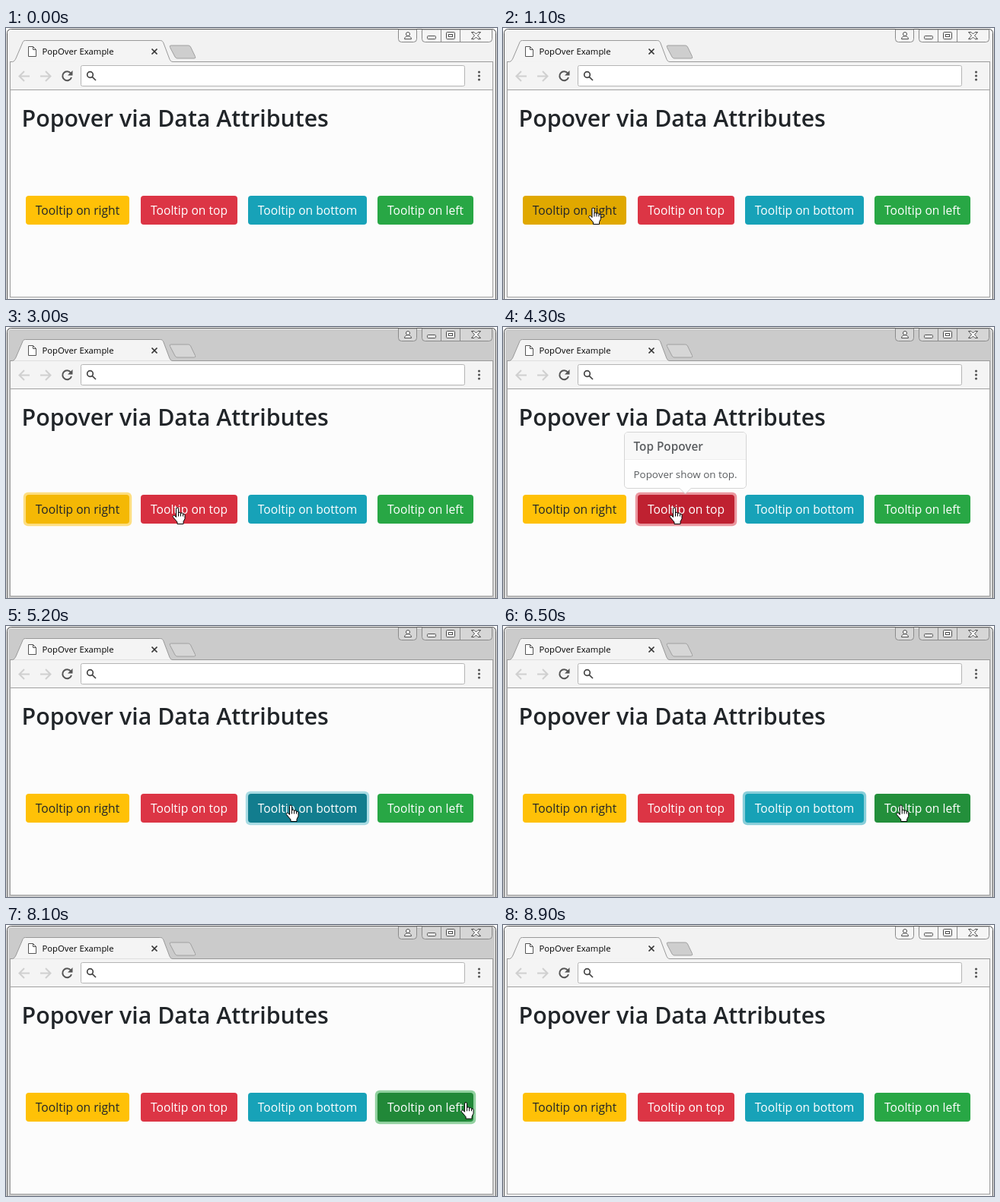
Animation, 645 px wide and 357 px high, one loop 9 s. Source, as an HTML page:

```html
<!DOCTYPE html>
<html lang="en">
<head>
<meta charset="utf-8">
<title>PopOver Example</title>
<style>
  html, body { margin: 0; width: 100%; height: 100%; overflow: hidden; background: #fff; }
  svg { display: block; width: 645px; height: 357px; font-family: "Open Sans", "Noto Sans", sans-serif; }
  .bold { font-weight: 600; }
</style>
</head>
<body>
<svg viewBox="0 0 645 357">
  <!-- window frame -->
  <path id="frame" d="M1.5 358V6.5a5 5 0 0 1 5-5H638.5a5 5 0 0 1 5 5V358" stroke="#484848"/>
  <path d="M2.5 358V7a4.5 4.5 0 0 1 4.5-4.5H638a4.5 4.5 0 0 1 4.5 4.5V358" fill="none" stroke="#fff" stroke-opacity=".7"/>
  <g id="controls" stroke="#8a8a8a">
    <path d="M515.5 2V14.5a4 4 0 0 0 4 4H535.5a4 4 0 0 0 4-4V2z"/>
    <path d="M546.5 2V14.5a4 4 0 0 0 4 4H634.5a4 4 0 0 0 4-4V2zM571.5 2V18M596.5 2V18"/>
  </g>
  <g fill="#fff" stroke="#4c4c4c">
    <circle cx="528" cy="8" r="2.5"/>
    <path d="M523.5 14.5c0-5 9-5 9 0z"/>
    <rect x="553.5" y="10.5" width="11" height="4" rx="1"/>
    <rect x="578.5" y="5.5" width="11" height="9" rx="1"/>
    <rect x="581.5" y="8.5" width="5" height="3"/>
    <path d="M611.5 5.5h3.5l2.5 2.5 2.5-2.5h3.5l-4 4.5 4 4.5h-3.5l-2.5-2.5-2.5 2.5h-3.5l4-4.5z"/>
  </g>

  <!-- tab strip and toolbar -->
  <rect x="5" y="45" width="635" height="37" fill="#f4f4f4"/>
  <path d="M5 44.5H8.5C11 44 12 42 13 40L21.5 20C22.5 17.5 23 16.5 25.5 16.5H202.5C205 16.5 206 17.5 207 20L214.5 40C215.500 42.500 216.500 44.500 219 44.5H640" fill="#f4f4f4" stroke="#999"/>
  <path id="newTab" d="M216.500 23H239.500q2 0 3 2L248.500 37.500q1 2.500-1 2.500H225q-2 0-3-2L215.500 25.500q-1-2.500 1-2.500z" stroke="#a0a0a0"/>
  <path d="M29.5 24.5h6l4 4v9h-10zM35.5 24.5v4h4" fill="#fff" stroke="#555"/>
  <text x="47.5" y="35" font-size="11.3">PopOver Example</text>
  <path d="M191.5 27.5l7 7M198.5 27.5l-7 7" stroke="#333" stroke-width="1.7"/>
  <g fill="none" stroke-width="2">
    <path d="M31 63.5H18M24 57l-6.5 6.5L24 70M45 63.5H58M52 57l6.5 6.5L52 70" stroke="#d0d0d0"/>
    <path d="M85 59.5A6 6 0 1 0 86 65" stroke="#555"/>
    <path d="M87.5 56v6.5H81z" fill="#555"/>
  </g>
  <rect x="98.5" y="49.5" width="504" height="27" rx="2" fill="#fff" stroke="#b4b4b4"/>
  <path d="M114.300 61.500a3.800 3.800 0 1 0-7.600 0a3.800 3.800 0 1 0 7.600 0M113.300 64.300L118 69" fill="none" stroke="#444" stroke-width="1.7"/>
  <path d="M621.5 58v10.500" stroke="#555" stroke-width="3.2" stroke-linecap="round" stroke-dasharray="0 5"/>

  <!-- page -->
  <rect x="5.5" y="81.5" width="634" height="273" fill="#fcfcfc" stroke="#a0a0a0"/>
  <path d="M5.5 45V82M639.5 45V82" stroke="#a0a0a0"/>
  <text class="bold" x="20.5" y="130" font-size="30.3" fill="#212529">Popover via Data Attributes</text>
  <g id="buttons"></g>
  <g id="popovers"></g>

  <g id="cursor" fill="#fff" stroke="#000">
    <path id="arrow" d="M.5 .5V16.5L4 13l2.5 6 2.5-1L6.5 12H11.5z"/>
    <path id="hand" transform="translate(-6.5 -.5)" d="M5 13V2a1.5 1.5 0 0 1 3 0V8a1.5 1.5 0 0 1 3 .3V8.7a1.5 1.5 0 0 1 3 .4V9.7a1.3 1.3 0 0 1 2.5 .5V15L14.5 19V22H6.5V19.5L1 13a1.5 1.5 0 0 1 2.2-2zM8 8V12M11 8.5V12M14 9.5V12"/>
  </g>
</svg>
<script>
const LOOP = 9000, STEP = 100, FADE = 150, HOLD = 110;
const TOP = 221, HEIGHT = 38, CARD = 74, GAP = 8.5;
const $ = id => document.getElementById(id);

// Colours: base, hover, pressed. Times: pointer enters, opens, closes, leaves.
const buttons = [
  { side: "Right", dx: 1, dy: 0, x: 26, w: 136, card: 169, note: "Right", ink: "#212529",
    colors: ["ffc107", "e0a800", "d39e00"], enter: 960, open: 1330, close: 2540, leave: 2910 },
  { side: "Top", dx: 0, dy: -1, x: 177, w: 127, card: 160, note: "top.", ink: "#fff",
    colors: ["dc3545", "c82333", "bd2130"], enter: 2950, open: 3420, close: 4150, leave: 4810 },
  { side: "Bottom", dx: 0, dy: 1, x: 318, w: 156, card: 184, note: "Bottom.", ink: "#fff",
    colors: ["17a2b8", "138496", "117a8b"], enter: 4830, open: 5101, close: 6040, leave: 6370 },
  { side: "Left", dx: -1, dy: 0, x: 488, w: 126, card: 159, note: "Left", ink: "#fff",
    colors: ["28a745", "218838", "1e7e34"], enter: 6395, open: 6720, close: 7520, leave: 8150 }
];

const START = [621, 51];
const moves = [
  { from: 500, to: 1050, x: 118.5, y: 237 },
  { from: 2800, to: 3000, x: 225, y: 238 },
  { from: 4600, to: 5000, x: 374, y: 236 },
  { from: 6300, to: 6530, x: 530, y: 236 },
  { from: 6500, to: 6700, x: 537, y: 236 },
  { from: 7700, to: 7800, x: 588, y: 237 },
  { from: 8000, to: 8300, x: 650, y: 228 }
];

const clamp = v => Math.max(0, Math.min(1, v));
const ease = v => v * v * (3 - 2 * v);
const ramp = (t, start, span = FADE) => clamp((t - start) / span);
const rgb = hex => [0, 2, 4].map(i => parseInt(hex.slice(i, i + 2), 16));
const mix = (a, b, k) => `rgb(${a.map((v, i) => Math.round(v + (b[i] - v) * k))})`;

function buttonMarkup({ x, w, side, ink, colors }) {
  return `<g>
    <rect x="${x - 3.2}" y="${TOP - 3.2}" width="${w + 6.4}" height="${HEIGHT + 6.4}" rx="6" fill="#${colors[0]}"/>
    <rect x="${x}" y="${TOP}" width="${w}" height="${HEIGHT}" rx="4"/>
    <text x="${x + w / 2}" y="246" font-size="15.6" text-anchor="middle" fill="${ink}">Tooltip on ${side.toLowerCase()}</text>
  </g>`;
}

// The card sits GAP pixels off its button, in direction (dx, dy).
function popoverMarkup({ x: left, w: width, side, dx, dy, card: w, note }) {
  const midX = left + width / 2 + dx * (width / 2 + GAP + w / 2);
  const midY = TOP + HEIGHT / 2 + dy * (HEIGHT / 2 + GAP + CARD / 2);
  const x = dx ? midX - w / 2 : Math.floor(midX - w / 2) - .5;
  const y = dy ? midY - CARD / 2 : midY - CARD / 2 - .5;
  const turn = Math.atan2(-dy, -dx) * 180 / Math.PI;
  const edgeX = x + w / 2 - dx * w / 2, edgeY = y + CARD / 2 - dy * CARD / 2;
  return `<g>
    <rect x="${x}" y="${y}" width="${w}" height="${CARD}" rx="4.5" fill="#fff" stroke="#c8c8c8"/>
    <path d="M${x + .5} ${y + 36}v-31.5a4 4 0 0 1 4-4h${w - 9}a4 4 0 0 1 4 4v31.5z" fill="#f7f7f7"/>
    <path d="M${x + .5} ${y + 36}h${w - 1}" stroke="#e8e8e8"/>
    <path d="M-.5-8L7.500 0L-.5 8" transform="translate(${edgeX} ${edgeY}) rotate(${turn})"
      fill="${dy > 0 ? "#f7f7f7" : "#fff"}" stroke="#c8c8c8"/>
    <text class="bold" x="${x + 12}" y="${y + 24.5}" font-size="15.3" fill="#212529">${side} Popover</text>
    <text x="${x + 12}" y="${y + 60.5}" font-size="13.4" fill="#212529">Popover show on ${note}</text>
  </g>`;
}

$("buttons").innerHTML = buttons.map(buttonMarkup).join("");
$("popovers").innerHTML = buttons.map(popoverMarkup).join("");
buttons.forEach((b, i) => {
  b.rgb = b.colors.map(rgb);
  [b.ring, b.face] = $("buttons").children[i].children;
  b.popover = $("popovers").children[i];
  b.blur = i < 3 ? buttons[i + 1].open : 8820;
  b.states = [[b.enter, 1], [b.open, 2], [b.open + HOLD, 1], [b.close, 2], [b.close + HOLD, 1], [b.leave, 0]];
});

function faceColor(b, t) {
  let from = 0, to = 0, start = 0;
  for (const [time, state] of b.states) {
    if (time > t) break;
    [from, to, start] = [to, state, time];
  }
  return mix(b.rgb[from], b.rgb[to], ease(ramp(t, start)));
}

function pointer(t) {
  let [x, y] = START;
  for (const m of moves) {
    const k = ease(ramp(t, m.from, m.to - m.from));
    x += (m.x - x) * k;
    y += (m.y - y) * k ** .75;
  }
  return [x, y];
}

const show = (el, on) => el.setAttribute("display", on ? "inline" : "none");

function draw(ms) {
  const t = Math.floor((ms % LOOP) / STEP) * STEP;
  const active = t >= 1400 && t < 8900;
  $("frame").setAttribute("fill", active ? "#cbcbcb" : "#f2f2f2");
  $("controls").setAttribute("fill", active ? "#d6d6d6" : "#f5f5f5");
  $("newTab").setAttribute("fill", active ? "#d6d6d6" : "#cecece");

  for (const b of buttons) {
    const glow = ease(ramp(t, b.open)) * (1 - ramp(t, b.blur, 80));
    b.ring.setAttribute("opacity", glow / 2);
    b.face.setAttribute("fill", faceColor(b, t));
    b.popover.setAttribute("opacity", ramp(t, b.open + HOLD) * (1 - ramp(t, b.close + HOLD)));
  }

  const [x, y] = pointer(t);
  const over = y >= TOP && buttons.some(b => x >= b.x && x <= b.x + b.w);
  show($("cursor"), t >= 500 && t < 8300);
  $("cursor").setAttribute("transform", `translate(${x} ${y})`);
  show($("arrow"), !over);
  show($("hand"), over);
}

const began = performance.now();
function tick() {
  draw(performance.now() - began);
  requestAnimationFrame(tick);
}
tick();
</script>
</body>
</html>
```
